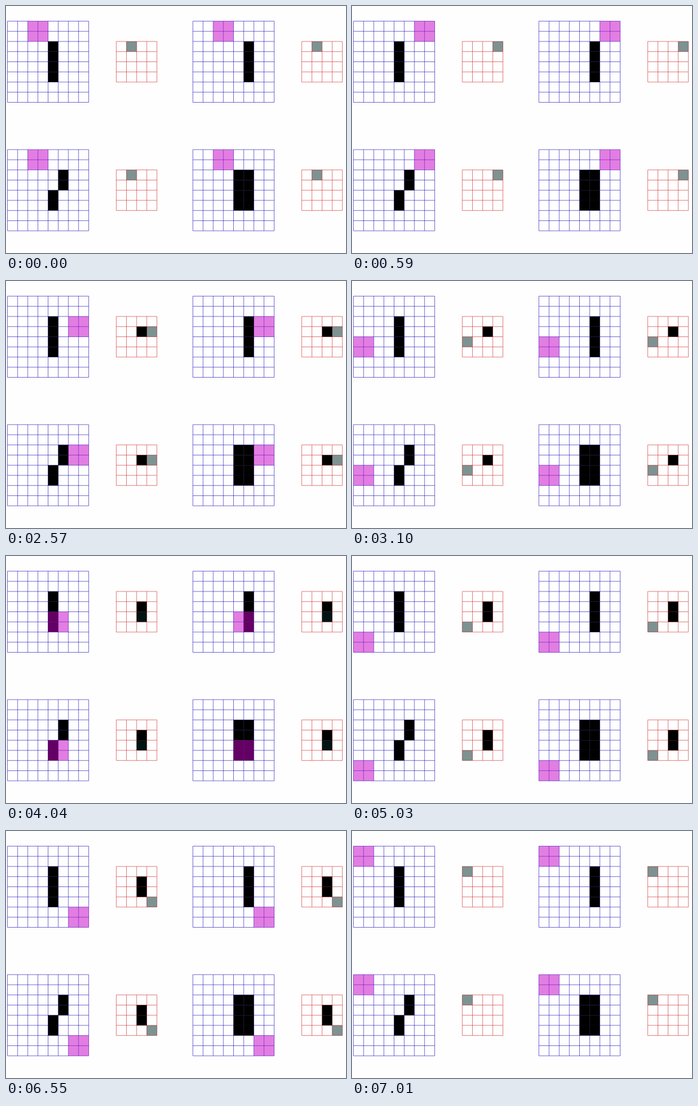
An HTML page with a canvas that plays this animation: 594x432 px, repeating every 7.08 s.

```html
<!DOCTYPE html>
<html lang="en">
<head>
<meta charset="utf-8">
<title>Pooling on four grids</title>
<style>
html, body { margin: 0; width: 100%; height: 100%; overflow: hidden; background: #fefefe; }
canvas { display: block; }
</style>
</head>
<body>
<canvas id="stage" width="594" height="432"></canvas>
<script>
const ctx = document.getElementById('stage').getContext('2d');
const LOOP = 7080, PITCH = 17.75;
const STEPS = [130, 590, 1120, 1580, 2110, 2570, 3100, 3580,
               4040, 4570, 5030, 5560, 6020, 6550, 7010];
const BLUE = '#1400b4', RED = '#cd1e1e';
const WINDOW = 'rgba(200, 0, 200, .5)', CURSOR = 'rgba(0, 40, 40, .5)';

// Blocks are [column, row, width, height] in cells.
const PANELS = [
  { x: 2.5, y: 26.5, blocks: [[4, 2, 1, 4]] },
  { x: 326.5, y: 26.5, blocks: [[5, 2, 1, 4]] },
  { x: 2.5, y: 251.2, blocks: [[5, 2, 1, 2], [4, 4, 1, 2]] },
  { x: 326.5, y: 251.2, blocks: [[4, 2, 2, 4]] }
];

// Cells are filled one by one, so thin seams of the grid stay visible.
function fillBlock(x, y, [c, r, w, h], color) {
  ctx.fillStyle = color;
  for (let i = c; i < c + w; i++) {
    for (let j = r; j < r + h; j++) {
      ctx.fillRect(x + i * PITCH, y + j * PITCH, PITCH, PITCH);
    }
  }
}

function drawLines(x, y, n, color) {
  const size = n * PITCH;
  ctx.strokeStyle = color;
  ctx.lineWidth = .6;
  ctx.beginPath();
  for (let k = 0; k <= n; k++) {
    const d = k * PITCH;
    ctx.moveTo(x + d, y);
    ctx.lineTo(x + d, y + size);
    ctx.moveTo(x, y + d);
    ctx.lineTo(x + size, y + d);
  }
  ctx.stroke();
}

function drawGrid(x, y, n, color, blocks, cover, tint) {
  drawLines(x, y, n, color);
  blocks.forEach(b => fillBlock(x, y, b, '#000'));
  fillBlock(x, y, cover, tint);
}

function draw(step) {
  const col = step % 4, row = step >> 2;
  const pooled = step < 6 ? [] : [[2, 1, 1, step < 10 ? 1 : 2]];
  ctx.fillStyle = '#fefefe';
  ctx.fillRect(0, 0, 594, 432);
  for (const { x, y, blocks } of PANELS) {
    drawGrid(x, y, 8, BLUE, blocks, [2 * col, 2 * row, 2, 2], WINDOW);
    drawGrid(x + 190.2, y + 2 * PITCH, 4, RED, pooled, [col, row, 1, 1], CURSOR);
  }
}

const start = performance.now();
let shown = -1;
function tick() {
  const t = (performance.now() - start) % LOOP;
  const step = (1 + STEPS.filter(s => t >= s).length) % 16;
  if (step !== shown) draw(shown = step);
  requestAnimationFrame(tick);
}
tick();
</script>
</body>
</html>
```
